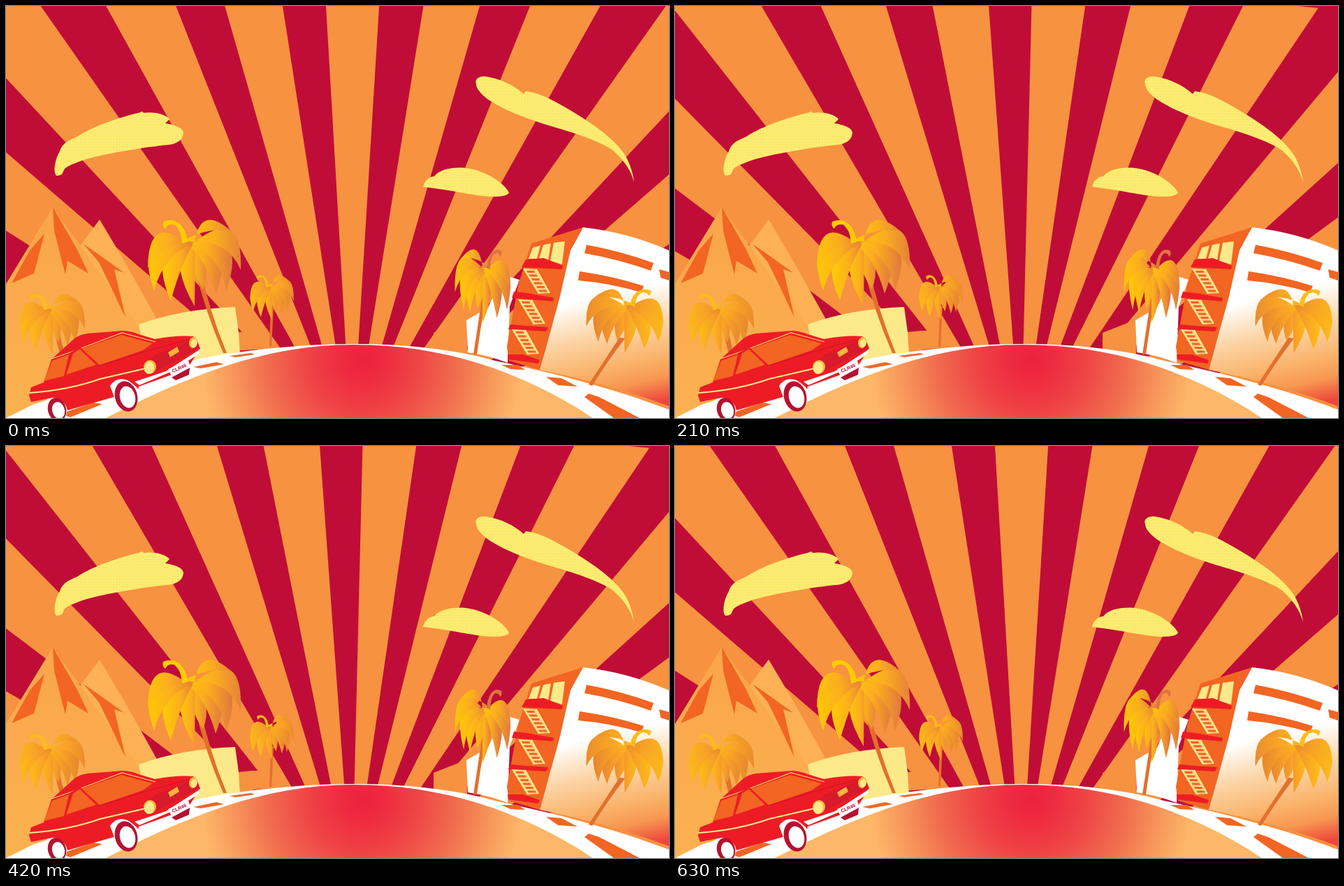
Write an HTML page with a canvas that moves like this. It is 949 by 590 pixels and loops after 770 ms.

```html
<!DOCTYPE html>
<html lang="en">
<head>
<meta charset="utf-8">
<title>Sunburst drive</title>
<style>
html, body { margin: 0; width: 100%; height: 100%; overflow: hidden; background: #c00d37; }
canvas { display: block; }
</style>
</head>
<body>
<canvas id="stage" width="949" height="590"></canvas>
<script>
const W = 949, H = 590, LOOP = 770;
const ctx = document.getElementById('stage').getContext('2d');
const ORANGE = '#f79240', CRIMSON = '#c00d37', RUST = '#f26522', RED = '#ed1c24', CREAM = '#fbe98a';

// Sky swing: [start time, degrees]
const swing = [[0, 0], [70, .85], [140, 3], [210, 4.72], [280, 5.36], [420, 4.72], [490, 3], [560, .85], [630, 0]];
// Orange rays between the dark ones, in degrees from vertical
const rays = [[-90, -64.8], [-57.6, -49.25], [-42.9, -35], [-28.95, -21.6], [-15.95, -8.85], [-3.33, 3.52],
  [9.15, 16.05], [21.85, 29.2], [35.25, 43.1], [49, 57], [64, 90]];

function path(d, fill, to = ctx) {
  to.fillStyle = fill;
  to.fill(new Path2D(d));
}
function line(c, d, color, width) {
  c.strokeStyle = color;
  c.lineWidth = width;
  c.stroke(new Path2D(d));
}
function oval(c, x, y, rx, ry, fill, turn = 0) {
  c.fillStyle = fill;
  c.beginPath();
  c.ellipse(x, y, rx, ry, turn, 0, Math.PI * 2);
  c.fill();
}
function ramp(gradient, ...stops) {
  stops.forEach(([at, color]) => gradient.addColorStop(at, color));
  return gradient;
}

function drawSky(deg) {
  ctx.fillStyle = CRIMSON;
  ctx.fillRect(0, 0, W, H);
  ctx.save();
  ctx.translate(495, 636);
  ctx.rotate(deg * Math.PI / 180);
  ctx.clip(new Path2D('M-1500 -691L1500 -651V900H-1500Z'));
  ctx.fillStyle = ORANGE;
  for (const edges of rays) {
    const [a, b] = edges.map(v => v * Math.PI / 180);
    ctx.beginPath();
    ctx.moveTo(0, 0);
    ctx.lineTo(1200 * Math.sin(a), -1200 * Math.cos(a));
    ctx.lineTo(1200 * Math.sin(b), -1200 * Math.cos(b));
    ctx.fill();
  }
  ctx.restore();
}

function drawClouds(c) {
  const tile = document.createElement('canvas');
  tile.width = tile.height = 4;
  const t = tile.getContext('2d');
  t.fillStyle = '#fbe964';
  t.fillRect(0, 0, 4, 4);
  t.fillStyle = '#fbed7e';
  t.fillRect(0, 0, 4, 1);
  t.fillRect(0, 0, 1, 4);
  const mesh = c.createPattern(tile, 'repeat');
  path('M72 243C66 236 72 216 77 208C82 194 92 192 102 187C125 172 160 160 190 153L195 151L197 153C210 151 228 154 234 162L228 168C240 170 254 174 254 182C253 193 243 198 231 199C200 202 150 210 120 218C105 222 90 228 84 233L80 241Q77 243 72 243Z', mesh, c);
  path('M673 112C670 104 678 100 687 101C708 104 728 114 741 126L744 122C760 124 773 130 786 137C835 164 872 190 887 215C893 226 897 238 899 252C895 237 886 222 869 207C845 190 800 178 770 169C735 158 692 140 679 124Q673 117 673 112Z', mesh, c);
  path('M597 259C599 250 606 244 613 244C620 234 640 230 658 232C685 235 712 252 720 267C718 273 705 273 692 273C665 271 640 264 597 259Z', mesh, c);
}

function drawHills(c) {
  path('M240 500L333 467L353 465L368 465L383 490Z', ORANGE, c);
  path('M612 500V468L660 449V500Z', ORANGE, c);
  path('M105 345L134 306L169 365L215 447L240 520H60Z', '#fbb154', c);
  path('M67 288L107 344L150 405L190 458L200 590H0V398Z',
    ramp(c.createLinearGradient(0, 288, 0, 580), [0, '#f9a54b'], [1, '#fcb150']), c);
  path('M107 344L134 306L169 365L215 447L190 460Z', '#fbb154', c);
  path('M55 326L34 350L8 397L40 383ZM67 288L69 322L85 385L88 365L118 383L102 349ZM111 341L133 367L139 379L171 446L155 377L169 382L130 354Z', RUST, c);
  path('M190 456Q250 434 328 431L333 467L335 500L270 510L195 482Z', CREAM, c);
}

function drawRoad(c) {
  path('M0 590L38 571C130 540 230 513 310 499C370 490 435 484 497 484C570 484 640 491 700 508C790 527 870 548 949 578V590Z', '#fff', c);
  const glow = ramp(c.createRadialGradient(510, 505, 0, 510, 507, 230),
    [0, '#ec223d'], [.13, '#ee2a40'], [.35, '#ef4546'], [.6, '#f16e4f'], [.8, '#f7955a'], [1, '#fdb768']);
  path('M143 590C260 530 370 485 497 485C625 485 737 522 840 590Z', glow, c);
  path('M268 517L301 510L312 513L279 519ZM320 501L351 497L356 499L328 503ZM78 584L125 568L138 570L92 589ZM709 514L733 514L743 521L722 520ZM773 531L795 533L818 545L790 543ZM834 555L849 560L907 590H870L828 560Z', RUST, c);
}

function drawTower(c) {
  path('M659 450L690 432C698 415 705 396 722 388L735 392L721 430L718 511Q690 500 661 496Z', '#fff', c);
  path('M752 340L826 317L812 342L792 420L764 521L720 508L717 488L733 400Z', RUST, c);
  const wall = ramp(c.createLinearGradient(840, 330, 896, 575),
    [0, '#fff'], [.34, '#fff'], [.56, '#fcd4a5'], [.75, '#fab36a'], [.87, '#f79750'], [1, '#ef463c']);
  path('M826 317Q890 324 949 350V573Q860 540 764 521L792 420L808 350Z', wall, c);
  path('M831 342Q880 351 927 368L923 379Q878 363 828 354ZM821 380Q870 387 913 401L909 410Q865 397 819 393ZM935 377L949 381V393L937 389Z', RUST, c);
  path('M754 346L765 343L760 362L748 362ZM769 342L780 340L776 364L763 362ZM784 339L800 337L796 370L779 365Z', CREAM, c);
  path('M744 363L770 361L797 372L796 377L738 374ZM727 409L745 411L784 418L783 423L724 418ZM722 456L745 458L776 460L773 466L719 463ZM718 499L740 499L764 507L762 512L719 506Z', RED, c);
  for (const [x, y] of [[741, 376], [734, 420], [725, 463]]) {
    c.save();
    c.translate(x, y);
    path('M0 0L18 1L37 35L22 36Z', '#fbd588', c);
    for (let i = 0; i < 6; i++) {
      path(`M${4 + i * 3.5} ${3 + i * 5.5}l11 0l1.5 3l-11 0Z`, RUST, c);
    }
    line(c, 'M0 0L22 36M18 1L37 35', CREAM, 2);
    c.restore();
  }
}

// Fronds from the crown's heart: bend x, bend y, tip x, tip y, width
const fronds = [
  [18, 30, 20, 64, 17], [-8, 30, 8, 88, 17], [46, 8, 38, 70, 24],
  [-34, 18, -26, 80, 24], [64, -6, 53, 66, 26], [-58, 2, -50, 66, 25],
  [66, -34, 74, 36, 26], [-48, -24, -59, 33, 21], [22, -42, 60, -20, 17]
];
function drawPalm(c, x, y, sx, sy, trunk, light, mid, dark) {
  path(trunk, '#e3702d', c);
  c.save();
  c.translate(x, y);
  c.scale(sx, sy);
  for (const [bx, by, tx, ty, w] of fronds) {
    const len = Math.hypot(tx, ty), nx = -ty / len * w, ny = tx / len * w;
    const lo = Math.min(0, tx, bx / 2) - 10, hi = Math.max(0, tx, bx / 2) + 12;
    const shade = ramp(c.createLinearGradient(lo, 0, hi, 0), [0, light], [.5, mid], [1, dark]);
    path(`M-8 -6Q${bx + nx} ${by + ny} ${tx} ${ty}Q${bx - nx} ${by - ny} 8 -4Z`, shade, c);
  }
  path('M-10 -2C-11 -18 -17 -34 -30 -28Q-33 -26 -34 -23Q-39 -27 -37 -33C-20 -41 -4 -28 -2 -4Z', light, c);
  c.restore();
}

function drawCar(c) {
  oval(c, 71, 577, 16, 19, '#fff', -.25);
  path('M33 558L36 546L54 539L65 506L97 477Q106 470 116 469L168 465Q181 466 190 470L213 477Q245 471 268 473L273 478L278 490L268 506L263 514L240 527L190 545L189 550L88 579Q84 562 66 561L36 567Z', RED, c);
  path('M54 537L66 508L90 499L83 530ZM86 528L96 498L106 490L131 513ZM108 491L165 471L210 483L196 493L134 514Z', RUST, c);
  line(c, 'M66 505L97 494L166 468L214 481', '#fbcf6c', 1.2);
  line(c, 'M84 531L93 497L106 490L132 515', RED, 2.5);
  line(c, 'M34 554Q90 550 135 534L204 518', CREAM, 2);
  line(c, 'M132 516L195 496L268 476', '#c9142f', 1);
  path('M197 513L215 499L265 478L273 482L275 491L214 523Z', '#d71a2c', c);
  path('M232 496L245 488L248 495L235 503Z', '#fbb43c', c);
  oval(c, 206, 517, 9, 10, '#fbb43c', .2);
  oval(c, 205, 518, 7, 9, CREAM, .2);
  oval(c, 268, 482, 6, 8, '#fbb43c', .2);
  oval(c, 269, 483, 4.5, 6, CREAM, .2);
  path('M149 544Q158 530 174 536Q188 544 192 554L188 570L160 574Z', '#fff', c);
  path('M184 538L229 523L274 494L278 491L276 498L240 522L191 543Z', '#fff', c);
  path('M237 532L263 518L262 528L243 536Z', '#b51230', c);
  for (const [x, y, rx, ry] of [[172, 559, 16, 22], [73, 578, 13, 17]]) {
    oval(c, x, y, rx, ry, '#b51230', -.25);
    oval(c, x + 2, y + 1, rx * .68, ry * .72, '#fff', -.25);
  }
  path('M232 520L261 508L264 517L237 530Z', '#fff', c);
  c.save();
  c.translate(248, 519);
  c.rotate(-.42);
  c.fillStyle = CRIMSON;
  c.font = 'bold 7px "Liberation Sans", sans-serif';
  c.textAlign = 'center';
  c.textBaseline = 'middle';
  c.fillText('CLR46', 0, 0);
  c.restore();
}

function buildScene() {
  const layer = document.createElement('canvas');
  layer.width = W;
  layer.height = H;
  const c = layer.getContext('2d');
  const sunny = ['#ffcb05', '#fbad1f', '#de7440'];
  const amber = ['#fdbc17', '#f8a326', '#e5842f'];
  drawClouds(c);
  drawHills(c);
  drawRoad(c);
  drawTower(c);
  drawPalm(c, 262, 342, 1, 1, 'M270 375L278 374Q290 435 316 497L311 497Q286 440 270 375Z', ...sunny);
  drawPalm(c, 377, 404, .47, .52, 'M379 430L383 430L380 488L377 488Z', ...amber);
  drawPalm(c, 687, 379, -.6, .85, 'M681 420L687 420Q679 460 674 499L669 499Z', ...[...sunny].reverse());
  drawPalm(c, 61, 437, .7, .7, 'M70 470L77 470L85 503L78 503Z', ...amber);
  drawPalm(c, 892, 432, -.83, .74, 'M878 475L886 476Q860 510 839 544L834 542Z', ...amber);
  drawCar(c);
  return layer;
}

const scene = buildScene();
const start = performance.now();
function frame(now) {
  const t = Math.max(0, now - start) % LOOP;
  drawSky(swing.filter(([at]) => at <= t).pop()[1]);
  ctx.drawImage(scene, 0, 0);
  requestAnimationFrame(frame);
}
frame(start);
</script>
</body>
</html>
```
